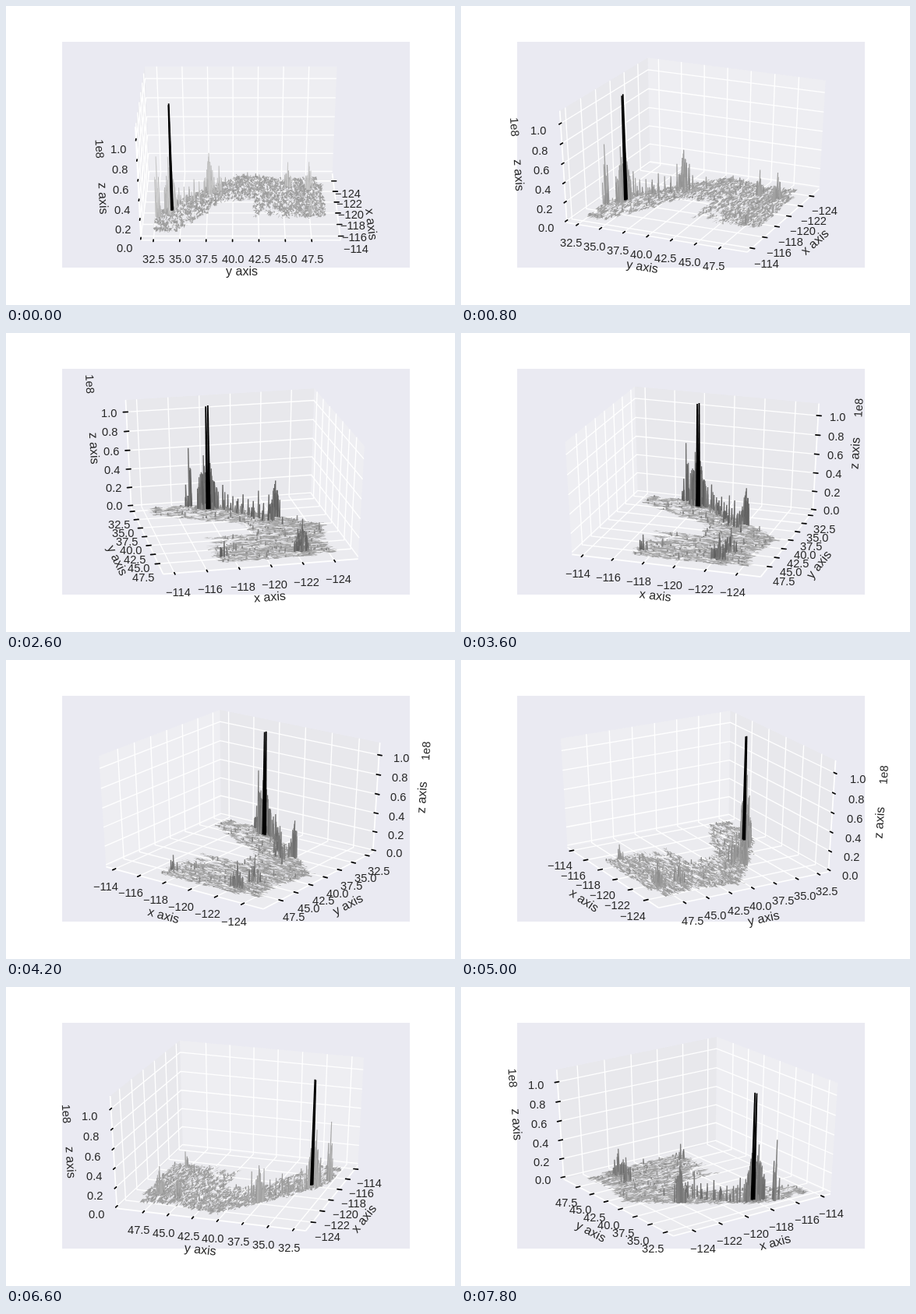
An HTML page with a canvas that plays this animation: 576x384 px, repeating every 8000 ms.

```html
<!DOCTYPE html>
<html lang="en">
<head>
<meta charset="utf-8">
<title>Rotating 3D plot</title>
<style>
  html, body { margin: 0; width: 100%; height: 100%; overflow: hidden; background: #fff; }
  canvas { display: block; }
</style>
</head>
<body>
<canvas id="stage" width="576" height="384"></canvas>
<script>
const ctx = document.getElementById('stage').getContext('2d');
const STEP_MS = 200, STEPS = 40, DEG_PER_STEP = 6;
const BOX = { x: 72, y: 46.1, w: 446.4, h: 289.9 };
const DIST = 10, ELEV = Math.PI / 6;
const HALF = 0.5 + 1 / 48;            // cube half size, with the pane margin
const DELTA = 1 / 12;
const TICK_PAD = 0.0833, LABEL_PAD = 0.1811;
const FONT = '"Liberation Sans", Arial, sans-serif';

// Data to centred unit cube
const lonTo = v => (v + 125.25) / 11.7 - 0.5;
const latTo = v => (v - 31.7) / 18.17 - 0.5;
const zTo = v => v / 1.1 - 0.5;

const range = (from, to, step) =>
  Array.from({ length: Math.round((to - from) / step) + 1 }, (_, i) => from + i * step);

const AXES = [
  { name: 'x axis', flip: 1, tickDir: 1, pane: '#eeeef2', to: lonTo,
    ticks: range(-124, -114, 2), text: v => '\u2212' + -v },
  { name: 'y axis', flip: 0, tickDir: 0, pane: '#e8e8ec', to: latTo,
    ticks: range(32.5, 47.5, 2.5), text: v => v.toFixed(1) },
  { name: 'z axis', flip: 0, tickDir: 0, pane: '#ebebef', to: zTo,
    ticks: range(0, 1, 0.2), text: v => v.toFixed(1) }
];

// ---------- data ----------
let seed = 20117;
function rnd() {
  seed = (seed + 0x6D2B79F5) | 0;
  let t = Math.imul(seed ^ (seed >>> 15), 1 | seed);
  t = (t + Math.imul(t ^ (t >>> 7), 61 | t)) ^ t;
  return ((t ^ (t >>> 14)) >>> 0) / 4294967296;
}
const spread = size => (rnd() - 0.5) * size;
const gauss = () => rnd() + rnd() + rnd() + rnd() - 2;

// Western and eastern edge of the land at a latitude
function westEdge(lat) {
  if (lat < 40.4) return -117.1 - 7.2 * ((lat - 32.5) / 7.9) ** 0.75;
  return lat > 48.4 ? -122.8 : -124.35 + 0.3 * Math.sin(Math.PI * (lat - 43) / 5);
}
function eastEdge(lat) {
  if (lat > 42) return -117;
  return lat > 39 ? -120 : Math.min(-114.5, -120 + (39 - lat) * 1.35);
}
const inLand = (lon, lat) =>
  lat > 32.5 && lat < 49 && lon > westEdge(lat) && lon < eastEdge(lat);

function landPoint() {
  for (;;) {
    const lon = -124.8 + rnd() * 10.4, lat = 32.5 + rnd() * 16.5;
    const inland = (lon - westEdge(lat)) / 7;
    const empty = lat < 44.8 ? inland * 0.75 : 0.1;
    const clump = 0.25 * Math.sin(lon * 4.1 + lat) * Math.sin(lat * 3.3 - lon);
    if (inLand(lon, lat) && rnd() > empty + clump) return [lon, lat];
  }
}

const facets = Array.from({ length: 3000 }, () => {
  const [lon, lat] = landPoint(), g = Math.round(152 + rnd() * 16);
  const corner = () => [lonTo(lon + spread(0.9)), latTo(lat + spread(0.42)), -0.5];
  return { points: [corner(), corner(), corner()], color: `rgb(${g},${g},${g})` };
});

const spikes = [], peaks = [];
const spike = (lon, lat, h) => ({
  base: [lonTo(lon), latTo(lat), -0.5], tip: [lonTo(lon), latTo(lat), zTo(h)],
  h, tone: spread(30)
});

function addCity(lon, lat, top, count) {
  spikes.push(spike(lon, lat, top));
  for (let i = 1; i < count; i++) {
    const dx = gauss() * 0.4, dy = gauss() * 0.38;
    const h = top * rnd() * Math.exp(-1.6 * Math.hypot(dx, dy));
    if (inLand(lon + dx, lat + dy)) spikes.push(spike(lon + dx, lat + dy, h));
  }
}
addCity(-117.05, 32.74, 0.63, 12);
addCity(-117.9, 33.8, 0.58, 60);
addCity(-118.3, 34.05, 0.5, 80);
addCity(-122.1, 37.6, 0.39, 80);
addCity(-122.67, 45.5, 0.26, 25);
addCity(-122.33, 47.6, 0.28, 35);
addCity(-117.42, 47.66, 0.17, 6);

// Towns along the inland valley, then low spikes everywhere
for (let i = 0; i <= 9; i++) {
  addCity(-119.1 - 0.27 * i, 34.2 + 0.49 * i, 0.31 - 0.16 * rnd(), 6);
}
for (let i = 0; i < 380; i++) {
  spikes.push(spike(...landPoint(), Math.min(0.08, -0.014 * Math.log(1 - rnd()))));
}
peaks.push(spike(-118.08, 34.03, 1.09), spike(-118.21, 34.05, 1.1));

// ---------- projection ----------
let ca = 1, sa = 0;
const ce = Math.cos(ELEV), se = Math.sin(ELEV);
const depth = ([x, y, z]) => DIST - (ce * (ca * x + sa * y) + se * z);

function project(p) {
  const d = depth(p);
  const right = -sa * p[0] + ca * p[1];
  const up = -se * (ca * p[0] + sa * p[1]) + ce * p[2];
  return [
    BOX.x + (0.095 + right / d) / 0.185 * BOX.w,
    BOX.y + BOX.h - (0.095 + up / d) / 0.185 * BOX.h
  ];
}

const withAt = (p, i, v) => p.map((c, k) => k === i ? v : c);
const flipped = (p, i) => withAt(p, i, -p[i]);
const outward = (p, axis, pad) => p.map((c, k) => k === axis ? c : c + (c < 0 ? -pad : pad));

function path(points) {
  ctx.beginPath();
  points.forEach(p => ctx.lineTo(...project(p)));
}
function fill(points, color) {
  path(points);
  ctx.fillStyle = color;
  ctx.fill();
}
function line(points, color, width) {
  path(points);
  ctx.strokeStyle = color;
  ctx.lineWidth = width;
  ctx.stroke();
}

function spinText(str, [x, y], size, angle, align) {
  ctx.save();
  ctx.translate(x + 1.3, y + 1.5);
  ctx.rotate(angle);
  ctx.font = `${size}px ${FONT}`;
  ctx.textAlign = align;
  ctx.fillText(str, 0, size * 0.17);
  ctx.restore();
}

// ---------- drawing ----------
function drawPane(i, far) {
  const a = (i + 1) % 3, b = (i + 2) % 3;
  fill([far, flipped(far, a), flipped(flipped(far, a), b), flipped(far, b)], AXES[i].pane);
}

function drawAxis(i, far) {
  const axis = AXES[i];
  const end1 = flipped(far, axis.flip);
  const end2 = flipped(end1, i);
  line([end1, end2], '#fff', 1.67);

  const [ax, ay] = project(end1), [bx, by] = project(end2);
  let angle = Math.atan2(by - ay, bx - ax);
  if (angle >= Math.PI / 2) angle -= Math.PI;
  if (angle < -Math.PI / 2) angle += Math.PI;

  ctx.fillStyle = '#262626';
  spinText(axis.name, project(outward(withAt(end1, i, 0), i, LABEL_PAD)), 16, angle, 'center');
  if (i === 2) {
    const atLeft = bx < project([0, 0, 0])[0];
    const align = atLeft && depth(end2) < DIST ? 'left' : 'right';
    spinText('1e8', project(outward(end2, i, LABEL_PAD)), 14.67, angle, align);
  }

  const spots = axis.ticks.map(axis.to);
  spots.forEach(v => {
    const corner = withAt(far, i, v);
    line([flipped(corner, (i + 1) % 3), corner, flipped(corner, (i + 2) % 3)], '#fff', 1.33);
  });

  const dir = axis.tickDir, reach = Math.sign(far[dir]) * DELTA;
  ctx.font = `14.67px ${FONT}`;
  ctx.textAlign = 'left';
  ctx.lineCap = 'round';
  spots.forEach((v, k) => {
    const at = withAt(end1, i, v);
    line([withAt(at, dir, at[dir] + 0.1 * reach), withAt(at, dir, at[dir] - 0.2 * reach)],
      '#000', 1.7);
    const [x, y] = project(outward(at, i, TICK_PAD));
    const text = axis.text(axis.ticks[k]);
    const left = x - ctx.measureText(text).width / 2;
    ctx.fillText(text, Math.round(left + 0.4), Math.round(y + 10.6));
  });
  ctx.lineCap = 'butt';
}

function drawSpike({ base, tip }, color, foot, head) {
  const [x1, y1] = project(base), [x2, y2] = project(tip);
  ctx.beginPath();
  ctx.moveTo(x1 - foot, y1);
  ctx.lineTo(x2 - head, y2);
  ctx.lineTo(x2 + head, y2);
  ctx.lineTo(x1 + foot, y1);
  ctx.fillStyle = color;
  ctx.fill();
}

function drawData() {
  const side = Math.abs(sa);
  facets.forEach(f => fill(f.points, f.color));

  spikes.sort((a, b) => depth(b.base) - depth(a.base));
  spikes.forEach(s => {
    const g = Math.round((s.h < 0.08 ? 166 - 26 * side : 192 - 88 * side) + s.tone);
    drawSpike(s, `rgb(${g},${g},${g})`, 0.9 + 0.2 * side, 0.5 + 0.2 * side);
  });
  peaks.forEach(s => drawSpike(s, '#000', 1.8, 0.9));
}

function draw(step) {
  const a = step * DEG_PER_STEP * Math.PI / 180;
  ca = Math.cos(a);
  sa = Math.sin(a);
  const far = [ca < -1e-9 ? HALF : -HALF, sa < -1e-9 ? HALF : -HALF, -HALF];

  ctx.fillStyle = '#fff';
  ctx.fillRect(0, 0, 576, 384);
  ctx.fillStyle = '#eaeaf2';
  ctx.fillRect(72, 46, 446, 290);
  for (let i = 0; i < 3; i++) drawPane(i, far);
  for (let i = 0; i < 3; i++) drawAxis(i, far);
  drawData();
}

let shown = -1;
function tick() {
  const step = Math.floor(performance.now() / STEP_MS) % STEPS;
  if (step !== shown) draw(shown = step);
  requestAnimationFrame(tick);
}
tick();
</script>
</body>
</html>
```
